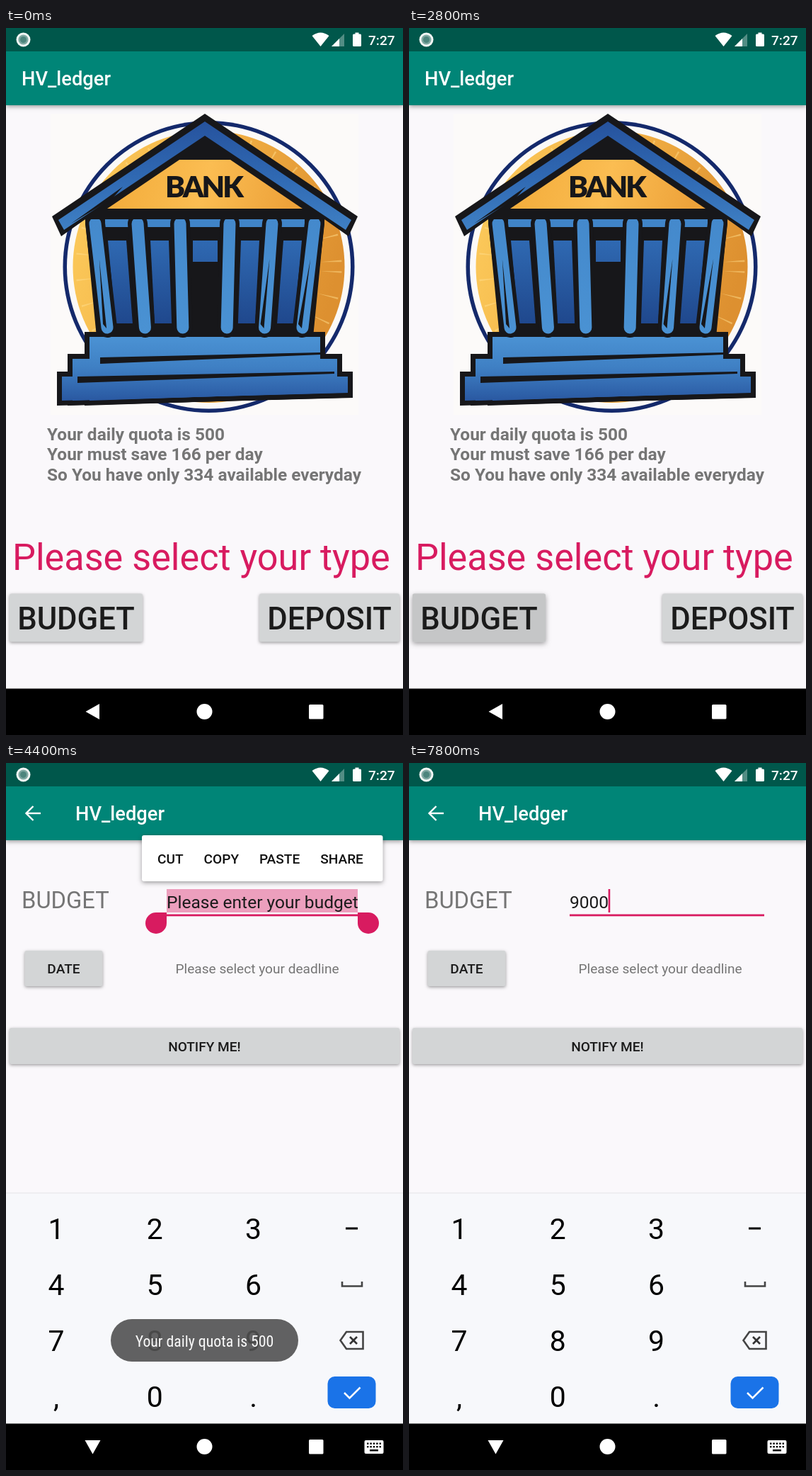
An HTML page with a canvas that plays this animation: 561x998 px, repeating every 8 s.

```html
<!DOCTYPE html>
<html lang="en">
<head>
<meta charset="utf-8">
<title>Budget app</title>
<style>
  html, body { margin: 0; width: 100%; height: 100%; overflow: hidden; background: #000; }
  canvas { display: block; width: 561px; height: 998px; }
</style>
</head>
<body>
<canvas id="stage" width="561" height="998"></canvas>
<script>
const ctx = document.getElementById('stage').getContext('2d');
const W = 561, NAV = 932.5, LOOP = 8000;
const APP = 'HV_ledger';
const BG = '#faf8fb', PINK = '#d81b60', INK = '#1b1b1b', GREY = '#757575';
const TOAST = 'Your daily quota is 500';
const HINT = 'Please enter your budget';
const AMOUNT = '9000', STROKES = [6500, 7100, 7300, 7800];

// Progress of t between a and b, from 0 to 1
const ramp = (t, a, b) => Math.min(1, Math.max(0, (t - a) / (b - a)));
const easeOut = p => 1 - (1 - p) ** 2;

function rect(x, y, w, h, fill) {
  ctx.fillStyle = fill;
  ctx.fillRect(x, y, w, h);
}

function round(x, y, w, h, r, fill) {
  ctx.beginPath();
  ctx.roundRect(x, y, w, h, r);
  ctx.fillStyle = fill;
  ctx.fill();
}

function trace(points) {
  ctx.beginPath();
  for (const [x, y] of points) ctx.lineTo(x, y);
}

function poly(points, fill) {
  trace(points);
  ctx.fillStyle = fill;
  ctx.fill();
}

function line(points, width, color, cap = 'butt') {
  trace(points);
  ctx.lineWidth = width;
  ctx.strokeStyle = color;
  ctx.lineCap = cap;
  ctx.stroke();
}

function disc(x, y, r, fill) {
  ctx.beginPath();
  ctx.arc(x, y, r, 0, 7);
  ctx.fillStyle = fill;
  ctx.fill();
}

function text(str, x, y, size, color, weight = 400, align = 'left') {
  ctx.font = `${weight} ${size}px Roboto, sans-serif`;
  ctx.textAlign = align;
  ctx.fillStyle = color;
  ctx.fillText(str, x, y);
}

function faded(alpha, draw) {
  if (alpha <= 0) return;
  ctx.save();
  ctx.globalAlpha *= alpha;
  draw();
  ctx.restore();
}

function shadowed(blur, dy, draw) {
  ctx.save();
  ctx.shadowColor = 'rgba(0,0,0,.38)';
  ctx.shadowBlur = blur;
  ctx.shadowOffsetY = dy;
  draw();
  ctx.restore();
}

function gradient(x0, y0, x1, y1, ...colors) {
  const g = ctx.createLinearGradient(x0, y0, x1, y1);
  colors.forEach((c, i) => g.addColorStop(i / (colors.length - 1), c));
  return g;
}

function button(label, x, y, w, h, size, press = 0) {
  shadowed(4 + 3 * press, 1.5 + press, () => round(x, y, w, h, 2.5, '#d3d5d6'));
  if (press) {
    ctx.save();
    ctx.beginPath();
    ctx.roundRect(x, y, w, h, 2.5);
    ctx.clip();
    disc(x + w / 2, y + h / 2, press * w * 0.56, '#c5c6c7');
    ctx.restore();
  }
  text(label, x + w / 2, y + h / 2 + size * 0.37, size, INK, 500, 'center');
}

function statusBar() {
  rect(0, 0, W, 33, '#00574b');
  disc(24.5, 16.5, 10, '#f2f6f5');
  disc(24.5, 16.5, 7, '#7fa8a2');
  disc(24.5, 16.5, 4.5, '#4d857d');

  ctx.beginPath();
  ctx.moveTo(444.5, 26);
  ctx.lineTo(432.5, 11);
  ctx.quadraticCurveTo(444.5, 2, 456.5, 11);
  ctx.fillStyle = '#fff';
  ctx.fill();

  const signal = (size, fill) => poly([[460, 26], [460 + size, 26], [460 + size, 26 - size]], fill);
  signal(18, 'rgba(255,255,255,.32)');
  signal(11, '#fff');
  round(490, 8.5, 12, 17.5, 1.5, '#fff');
  rect(493.5, 6.5, 5, 3, '#fff');
  text('7:27', 512, 23.5, 19.1, '#fff', 500);
}

function appBar(titleX) {
  shadowed(6, 2, () => rect(0, 33, W, 76, '#008577'));
  text(APP, titleX, 81, 27.27, '#fff', 500);
}

function navBar(typing) {
  rect(0, NAV, W, 66, '#000');
  if (typing) {
    poly([[111.5, 956], [133.5, 956], [122.5, 975.5]], '#fff');
    round(506.5, 956, 27, 19, 2, '#fff');
    for (let i = 0; i < 10; i++)
      rect(510 + (i % 5) * 4.4, 959.5 + (i > 4) * 4.5, 2.4, 2.4, '#000');
    rect(514, 969, 12, 2.5, '#000');
  } else {
    poly([[112.5, 965], [132, 954], [132, 976]], '#fff');
  }
  disc(280.5, 965, 11, '#fff');
  round(428, 955, 20.5, 20.5, 1.5, '#fff');
}

// ---- Bank picture, built around a vertical axis ----
const AXIS = 281, BLACK = '#17171a';

// Fills a shape given by its right half, as offsets from the axis
function mirrored(half, fill) {
  const side = s => half.map(([dx, y]) => [AXIS + s * dx, y]);
  poly([...side(1), ...side(-1).reverse()], fill);
}

function sun() {
  const x = 286.5, y = 337;
  disc(x, y, 206, '#14296b');
  disc(x, y, 200.5, '#fbf9f7');
  disc(x, y, 192, gradient(95, 200, 480, 300, '#fccb5c', '#f2b044', '#dd9030'));
  for (let a = 0.04; a < 6.28; a += 0.2) {
    const at = (r, d) => [x + r * Math.cos(a + d), y + r * Math.sin(a + d)];
    poly([at(158, 0), at(188, -0.007), at(188, 0.007)], 'rgba(255,222,140,.5)');
  }
}

function roof() {
  mirrored([[0, 121], [216, 266], [203, 294], [169, 270]], BLACK);
  mirrored([[0, 132], [207, 271], [199, 285], [0, 152]],
    gradient(0, 130, 0, 285, '#26529d', '#2f68b2', '#3f80c4'));
  mirrored([[36, 186], [138, 255]], gradient(160, 190, 400, 255, '#f3ad3c', '#fbbd52', '#eda23a'));
  poly([[92, 276], [165, 224], [150, 241]], BLACK);
  ctx.save();
  ctx.font = '900 42px Lato, sans-serif';
  ctx.letterSpacing = '-3px';
  ctx.textAlign = 'center';
  ctx.fillStyle = BLACK;
  ctx.fillText('BANK', AXIS - 2, 239);
  ctx.restore();
}

function hall() {
  mirrored([[170, 262], [153, 436]], BLACK);
  rect(140, 269, 282, 12, '#4084c8');
  const glass = gradient(0, 300, 0, 420, '#2f69b2', '#1f478c');
  rect(264, 300, 35, 30, glass);
  for (const dx of [-124, -64, 64, 124]) {
    const top = AXIS + dx, base = AXIS + dx * 0.92;
    poly([[top - 13, 300], [top + 13, 300], [base + 12, 417], [base - 12, 417]], glass);
  }
}

// Pillars lean inwards: every foot is nearer to the axis than its top
function pillars() {
  const blue = gradient(0, 270, 0, 430, '#4489cc', '#4a92d3');
  for (let i = 0; i < 6; i++) {
    const side = i < 3 ? -1 : 1, dx = side * (35 + 60 * (i % 3));
    const top = AXIS + dx, foot = AXIS + dx * 0.89;
    line([[top, 276], [foot, 423]], 28, BLACK, 'round');
    line([[top, 276], [foot, 423]], 17, blue, 'round');
    if (i % 3 && i !== 1) {
      const lean = (foot - top) / 147;
      poly([[top + lean * 50, 326], [foot - 1, 424], [foot - 6, 418]], BLACK);
    }
  }
}

function steps() {
  const tiers = (inset, fill) => {
    for (let i = 0; i < 3; i++) {
      const half = 170 + 28.5 * i - 4.5 * i * i - inset;
      const top = 429 + 34 * i - 3 * i * i + inset;
      poly([[AXIS - half, top], [AXIS + half, top],
        [AXIS + half, 522 - inset], [AXIS - half, 533 - inset]], fill);
    }
  };
  tiers(0, BLACK);
  tiers(7, gradient(0, 432, 0, 525, '#4c94d5', '#3f80c4', '#2a59a2'));
  const crease = (x0, x1, y) => poly([[x0, y], [x1, y - 7], [x1, y - 4], [x0, y + 9]], BLACK);
  crease(133, 445, 465);
  crease(101, 464, 492);
}

function home(press) {
  rect(0, 33, W, 900, BG);
  rect(63, 121, 435, 425, '#fcfaf9');
  sun();
  hall();
  steps();
  pillars();
  roof();
  [TOAST, 'Your must save 166 per day', 'So You have only 334 available everyday']
    .forEach((s, i) => text(s, 58, 581.5 + i * 28.7, 24.45, GREY, 700));
  text('Please select your type', 9, 765, 52.2, PINK);
  button('BUDGET', 5, 798.5, 188, 68, 43.6, press);
  button('DEPOSIT', 358, 798.5, 198, 68, 43.6);
  appBar(22);
}

function form(t) {
  const typed = AMOUNT.slice(0, STROKES.filter(at => t >= at).length);
  const selected = t >= 3900 && !typed;
  const value = typed || HINT;

  rect(0, 33, W, 900, BG);
  appBar(98);
  line([[49, 71], [29, 71]], 2.4, '#fff');
  line([[38.5, 61], [28.5, 71], [38.5, 81]], 2.4, '#fff');

  text('BUDGET', 22, 205, 32.73, GREY);
  rect(227, 213.5, 275, 2.8, PINK);
  if (selected) rect(227, 178, 270, 33, 'rgba(216,27,96,.4)');
  text(value, 227, 204.5, 24.54, INK);
  if (typed || (t >= 3500 && t < 3900)) {
    const end = typed ? ctx.measureText(value).width : 0;
    rect(226.5 + end, 178, 2.6, 33, PINK);
  }
  if (t >= 4000 && t < 6700) {
    round(197, 211, 30, 30, [15, 0, 15, 15], PINK);
    round(497, 211, 30, 30, [0, 15, 15, 15], PINK);
  }

  button('DATE', 26.5, 265, 110, 50, 19.1);
  text('Please select your deadline', 239.5, 297, 19.1, GREY);
  button('NOTIFY ME!', 5, 374, 551, 51, 19.1);

  faded(ramp(t, 4000, 4300) - ramp(t, 6600, 6900), () => {
    shadowed(6, 2, () => round(192, 102, 340.5, 65, 3, '#fff'));
    let x = 214;
    for (const label of ['CUT', 'COPY', 'PASTE', 'SHARE']) {
      text(label, x, 142, 19.1, '#111', 500);
      x += ctx.measureText(label).width + 29;
    }
  });
}

function keyboard(p) {
  ctx.save();
  ctx.beginPath();
  ctx.rect(0, 33, W, 900);
  ctx.clip();
  ctx.translate(0, (1 - p) * 90);
  ctx.globalAlpha = p;
  rect(0, 606, W, 2, '#eeeef1');
  rect(0, 608, W, 326, '#f7f8fb');
  ['123', '456', '789', ',0.'].forEach((row, r) =>
    [...row].forEach((key, c) => text(key, 71 + c * 139.3, 672 + r * 79, 40.9, '#000', 400, 'center')));
  rect(480, 655.5, 17, 3, '#000');
  line([[475, 732], [475, 738.5], [503, 738.5], [503, 732]], 2.6, '#444');
  trace([[472.5, 815], [481, 803], [504.5, 803], [504.5, 827], [481, 827]]);
  ctx.closePath();
  ctx.stroke();
  for (const d of [-5, 5]) line([[491 - d, 810], [491 + d, 820]], 2.6, '#333');
  round(454.5, 866, 68, 45, 10, '#1a73e8');
  line([[478, 889], [485.5, 896.5], [500.5, 881.5]], 2.5, '#fff');
  ctx.restore();
}

function toast() {
  round(148, 785, 265, 60, 30, 'rgba(81,81,81,.9)');
  // Condensed face when there is one, else a smaller regular size
  ctx.font = '21.8px "Roboto Condensed", Roboto, sans-serif';
  if (ctx.measureText(TOAST).width > 208) ctx.font = '19.5px Roboto, sans-serif';
  ctx.textAlign = 'center';
  ctx.fillStyle = '#fafafa';
  ctx.fillText(TOAST, 280.5, 823.5);
}

function draw(t) {
  const enter = easeOut(ramp(t, 2800, 3200));
  const keys = easeOut(ramp(t, 3950, 4350));
  if (enter < 1) home(easeOut(ramp(t, 2400, 2800)));
  faded(enter, () => {
    ctx.translate(0, (1 - enter) * 60);
    form(t);
  });
  if (keys > 0) keyboard(keys);
  statusBar();
  navBar(t >= 4100);
  faded(easeOut(ramp(t, 3100, 3500)) - ramp(t, 6130, 6760), toast);
}

function tick(now) {
  // The screen refreshes ten times a second
  draw(Math.floor((now % LOOP) / 100) * 100);
  requestAnimationFrame(tick);
}
requestAnimationFrame(tick);
</script>
</body>
</html>
```
